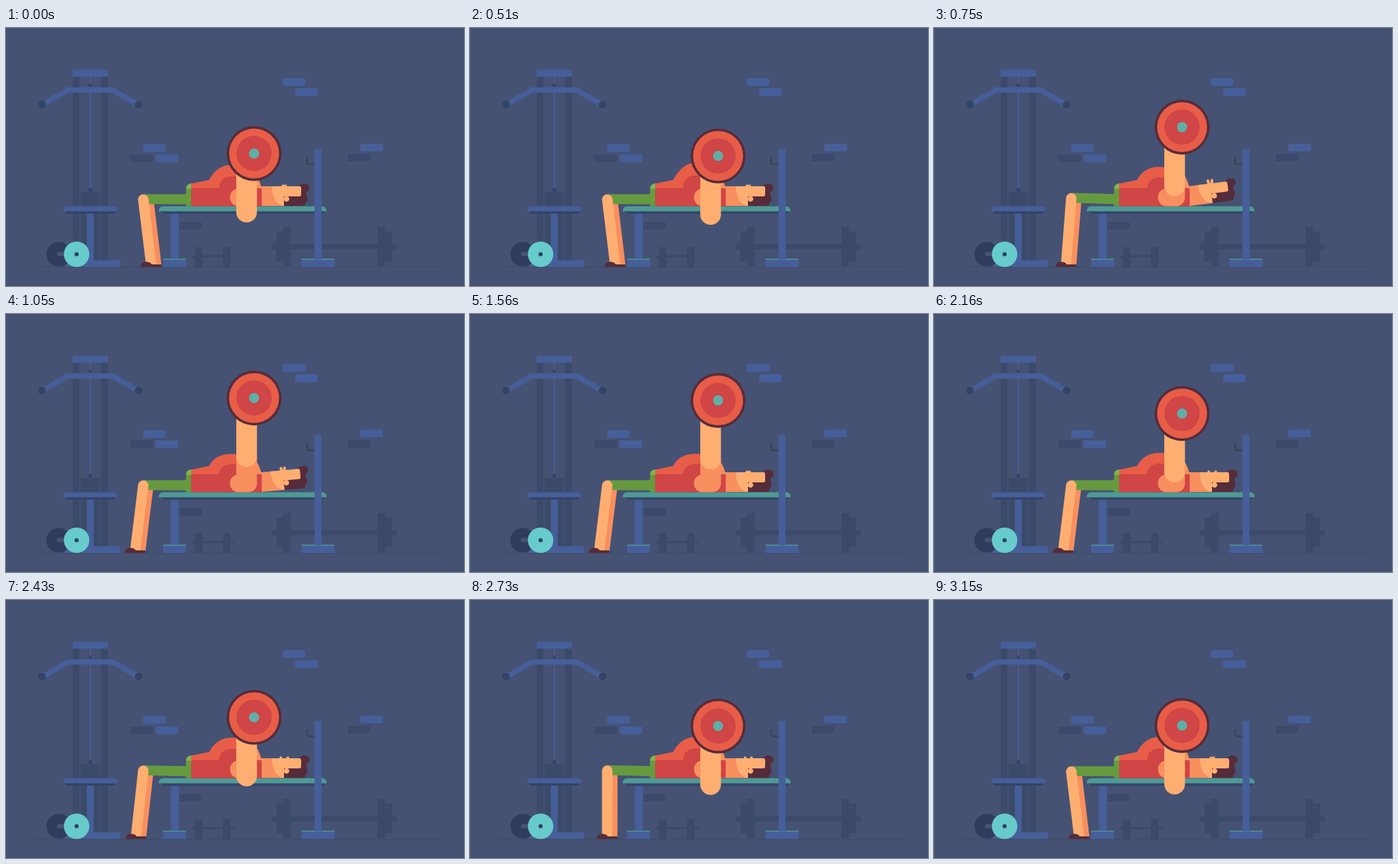
Animation, 720 px wide and 406 px high, one loop 3210 ms. Source, as an HTML page:

```html
<!DOCTYPE html>
<html lang="en">
<head>
<meta charset="utf-8">
<title>Bench press</title>
<style>
  html, body { margin: 0; width: 100%; height: 100%; overflow: hidden; background: #455273; }
  svg { display: block; width: 100%; height: 100%; }
  .dark { fill: #3b4a6b; }
  .navy { fill: #344364; }
  .blue { fill: #465f9b; }
  .teal { fill: #4f9a94; }
  .skin { fill: #ffae71; }
  .shade { fill: #f88f5e; }
  .red { fill: #e85d47; }
  .crimson { fill: #d04545; }
  .green { fill: #669a3f; }
  .hair { fill: #562c3a; }
  .line { fill: none; }
</style>
</head>
<body>
<svg viewBox="0 0 720 406">
  <path d="M43 376.5H683" stroke="#3e4a69"/>
  <g id="bricks"></g>

  <g id="machine">
    <g data-mirror="132.5">
      <path class="dark" d="M105 70h10.500V366H105zM117.500 258H133v24H117.500zM117.500 290h9V366h-9z"/>
      <path class="line" d="M57 121L97 97.500H133" stroke="#465f9b" stroke-width="8"/>
      <circle class="navy" cx="56.500" cy="120.500" r="6"/>
    </g>
    <path class="blue" d="M105 66h55v10.500h-55zM127.500 291h10V368h-10zM94 365.500h85.500V376H94z"/>
    <path class="line" d="M132.500 76V255" stroke="#465f9b" stroke-width="2"/>
    <g class="navy">
      <circle cx="132.500" cy="90" r="2.500"/>
      <circle cx="132.500" cy="255" r="3"/>
      <path d="M92 288H173L170 292H95z"/>
    </g>
    <path class="blue" d="M90 288.500v-1.500q0-6 6-6.500H169q6 .5 6 6.500v1.500z"/>
    <circle cx="83" cy="356" r="19.500" fill="#2f3c5e"/>
    <rect x="80" y="352.500" width="20" height="6.500" rx="3" fill="#455273"/>
    <circle cx="111" cy="356" r="20" fill="#67cbcb"/>
    <circle class="navy" cx="111" cy="356" r="3.300"/>
  </g>

  <g class="dark">
    <path data-mirror="325" d="M297 345h12v31h-12z"/>
    <rect x="292" y="357.500" width="67" height="3.500" rx="1.700"/>
    <path data-mirror="516" d="M425 320h11v-7h12v62h-12v-8h-11z"/>
    <rect x="417" y="340" width="198" height="8.500" rx="4"/>
  </g>

  <g id="bench">
    <path class="blue" d="M259.500 290h12V365h-12zM247 364h36v12h-36zM464.500 364h52v12h-52z"/>
    <path class="teal" d="M247 363h36v1.500h-36zM464.500 363h52v1.500h-52z"/>
    <path d="M243 288H502L498 292.500H247z" fill="#35456a"/>
    <path class="teal" d="M240 288.500q0-8 8-8H496q8 0 8 8z"/>
    <path class="line" d="M473.500 203v8.500q0 3 3 3H486" stroke="#394550" stroke-width="2.500"/>
    <path class="blue" d="M485 190.500h11V364h-11z"/>
  </g>

  <g id="leg">
    <path id="calf" class="shade"/>
    <path id="thigh" class="green"/>
    <path id="shin" class="skin"/>
    <path id="shoe" class="hair" d="M0 376q0-8 8-8q7 0 9 4H32V376z"/>
    <path class="green" d="M283 252h9v28.500h-9z"/>
    <path d="M283 253q0-8 9-8.500v8.500z" fill="#80b552"/>
  </g>

  <g id="head">
    <path class="shade" d="M398 249H440V280H398z"/>
    <path class="hair" d="M461 252q0-7 6-7h4q6 1 6 6q0 4-3 6q-3 3-2 6q3 2 1 5q2 4-2 6q0 6-5 6H437V264H461z"/>
    <path class="line" d="M470 267q3 1 3 6" stroke="#562c3a" stroke-width="1.500"/>
    <path class="skin" d="M418 249H461q3 0 3 3V262q0 3-3 3H437V280C425 279 418 266 418 249z"/>
    <circle class="skin" cx="441" cy="269" r="4.300"/>
    <path id="brow" class="line" stroke="#ffae71" stroke-width="4.200" stroke-linecap="round" stroke-linejoin="round"/>
  </g>

  <g id="torso">
    <path id="belly" class="red"/>
    <path class="shade" d="M390 228Q397 234 401 249V252H390z"/>
    <path id="chest" class="crimson"/>
    <path class="crimson" d="M291 252H400q2 0 2 3V280.500H291z"/>
    <path id="upperArm" class="shade"/>
  </g>
  <g id="press">
    <rect class="skin" x="362" width="32.500" height="108.500" rx="16.200"/>
    <g transform="translate(390 0)">
      <circle class="hair" r="43.200"/>
      <circle class="red" r="39.300"/>
      <circle class="crimson" r="27.700"/>
      <circle r="8" fill="#5fafa6"/>
    </g>
  </g>
</svg>
<script>
const LOOP = 3210;
const $ = id => document.getElementById(id);
const setPath = (id, d) => $(id).setAttribute('d', d);
const move = (id, value) => $(id).setAttribute('transform', value);

// Eased step from 0 to 1 between two times.
function ramp(t, from, to) {
  const u = Math.min(1, Math.max(0, (t - from) / (to - from)));
  return (1 - Math.cos(Math.PI * u)) / 2;
}

function mirrorParts() {
  for (const part of document.querySelectorAll('[data-mirror]')) {
    const twin = part.cloneNode(true);
    twin.setAttribute('transform', `matrix(-1 0 0 1 ${2 * part.dataset.mirror} 0)`);
    part.after(twin);
  }
}

function addBrick(kind, x, y) {
  $('bricks').innerHTML += `<rect class="${kind}" x="${x}" y="${y}" width="35.5" height="12" rx="2"/>`;
}

// Lower bricks sit half a brick to either side of the upper one.
function addBricks(x, y, left, right) {
  addBrick('blue', x, y);
  if (left) addBrick('dark', x - 20, y + 16);
  if (right) addBrick('blue', x + 19.5, y + 16);
}

function drawArmAndTorso(t) {
  const lift = 197.5
    + 6.5 * ramp(t, 210, 450)
    - 73 * ramp(t, 450, 950)
    + 5 * ramp(t, 950, 1260)
    + 62.3 * ramp(t, 1810, 2710)
    - 0.8 * ramp(t, 2710, 3150);
  move('press', `translate(0 ${lift})`);

  const elbow = Math.min(lift + 92, 266);
  setPath('upperArm', `M366 252.5H362V${elbow}H394.5V266.5a14 14 0 0 1-14 14H366a14 14 0 0 1 0-28z`);

  // The chest fills as the weight sinks, with a deep breath before the push.
  const breath = ramp(t, 210, 480) - ramp(t, 480, 750);
  const top = 220 - 0.073 * (lift - 136) - 3.2 * breath;
  setPath('belly', `M291 253V245L319.5 239C326 226 338 ${top} 354 ${top}C380 ${top} 396 230 401 249V253z`);
  const fold = 126 + top / 2;
  setPath('chest', `M335 253C335 ${fold + 7} 343 ${fold} 354 ${fold}H375V253z`);
}

function drawLeg(t) {
  const back = ramp(t, 510, 845) - ramp(t, 2310, 3150);
  const ankle = 220 - 25 * back;
  const knee = 2 * (ramp(t, 510, 740) - ramp(t, 740, 1000) + ramp(t, 2340, 2500) - ramp(t, 2500, 3150));
  const y = 270 - knee;
  setPath('shin', `M207.5 ${y}a8.3 8.3 0 0 1 16.6 0L${ankle + 16} 372H${ankle}z`);
  setPath('calf', `M220 ${y}H232L${ankle + 24.3} 372H${ankle + 12}z`);
  setPath('thigh', `M216 ${y - 8.5}L291 261.5V277.5L216 ${y + 7}z`);
  move('shoe', `translate(${ankle - 8} 0)`);
}

function drawHead(t) {
  const strain = ramp(t, 540, 750) - ramp(t, 900, 1310);
  move('head', `rotate(${-7.3 * strain} 402 270)`);
  const spread = 2 + 3.5 * (ramp(t, 1830, 2130) - ramp(t, 2600, 3150));
  const left = 437.5 - spread;
  const right = 437.5 + spread;
  const tip = 248.3 - 4 * strain;
  setPath('brow', `M${left - 1.5 * strain} ${tip}L${left} 251H${right}L${right + strain} ${tip}`);
}

mirrorParts();
addBricks(435, 79, false, true);
addBricks(215.5, 183, true, true);
addBricks(557, 182, true, false);
addBrick('dark', 272.5, 305);

const start = performance.now();
function tick() {
  const t = (performance.now() - start) % LOOP;
  drawArmAndTorso(t);
  drawLeg(t);
  drawHead(t);
  requestAnimationFrame(tick);
}
tick();
</script>
</body>
</html>
```
